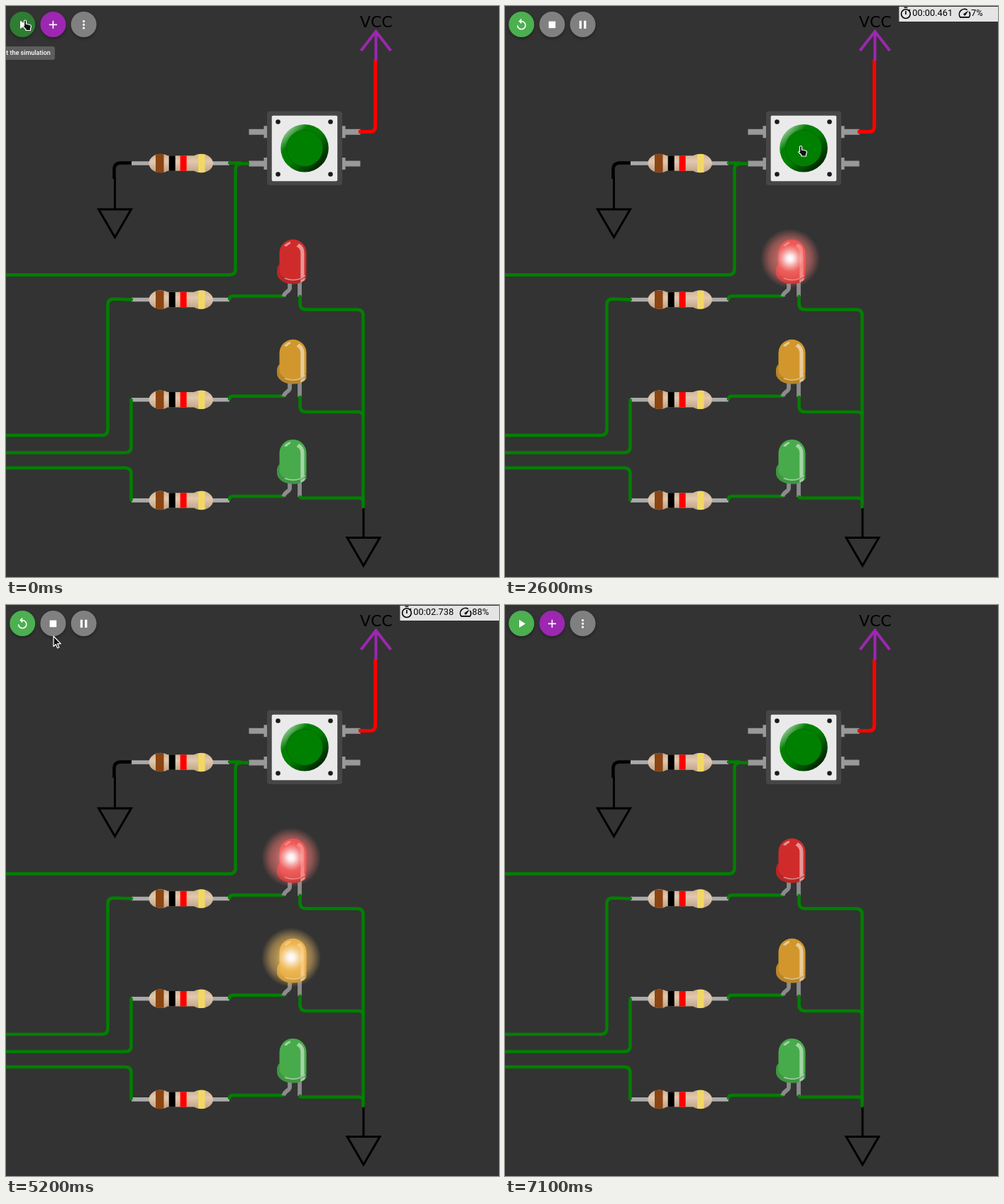
Write an HTML page that moves like this. It is 695 px wide and 806 px high and loops after 7.6 s.

```html
<!DOCTYPE html>
<html lang="en">
<head>
<meta charset="utf-8">
<title>Traffic light circuit</title>
<style>
  html, body { margin: 0; width: 100%; height: 100%; overflow: hidden; background: #333; }
  svg { position: absolute; left: 0; top: 0; }
  text { font: 12.8px Roboto, sans-serif; }
  .wire { fill: none; stroke: #008000; stroke-width: 4.5; stroke-linecap: round; stroke-linejoin: round; }
  .disc { filter: drop-shadow(0 2px 2px rgba(0, 0, 0, .35)); }
  #tip {
    position: absolute; top: 57px; transform: translateX(-50%); white-space: nowrap;
    padding: 0 6.4px; border-radius: 3.2px; background: #5d5d5d; color: #fff;
    font: 500 9px/19px Roboto, sans-serif;
  }
</style>
</head>
<body>
<svg width="695" height="806" viewBox="0 0 695 806">
  <defs>
    <linearGradient id="skin" x2="0" y2="1">
      <stop stop-color="#cbb094"/><stop offset=".4" stop-color="#e1c8ae"/><stop offset="1" stop-color="#bea287"/>
    </linearGradient>
    <linearGradient id="rim" x2="1" y2="1">
      <stop stop-color="#fff"/><stop offset=".3" stop-color="#008000"/>
      <stop offset=".5" stop-color="#008000"/><stop offset="1"/>
    </linearGradient>
    <path id="tube" d="M41 0C32 0 24.500 6 24.500 13.300S32 26.600 41 26.600q6 0 10-2.600H88q4 2.600 10 2.600c9 0 17-6 17-13.300S107 0 98 0q-6 0-10 2.600H51Q47 0 41 0z"/>
    <clipPath id="tubeClip"><use href="#tube"/></clipPath>
    <g id="resistor">
      <path stroke="#aaa" stroke-width="5.600" d="M0 13.300H138"/>
      <use href="#tube" fill="url(#skin)"/>
      <g clip-path="url(#tubeClip)">
        <path fill="#8b4513" d="M34 0h11.500v27H34z"/>
        <path d="M52.700 0h9v27h-9z"/>
        <path fill="red" d="M68.600 0h9v27h-9z"/>
        <path fill="#f1d863" d="M94 0h9.500v27H94z"/>
      </g>
    </g>
    <g id="led">
      <path fill="none" stroke="#8c8c8c" stroke-width="5.800" d="M32 58V81M18 58V69q0 2-4 5t-4.500 6.500"/>
      <path fill="currentColor" d="M3.500 35V19a19 19 0 0 1 38 0V55.500q-7 7.400-19 7.400C10 62.900 0 56 0 47.200V43q0-4.500 3.500-8z"/>
      <path opacity=".12" d="M3.500 35v8.200a19 13.300 0 0 0 38 0V55.500q-7 7.400-19 7.400C10 62.900 0 56 0 47.200V43q0-4.500 3.500-8z"/>
      <g fill="#fff" opacity=".5">
        <path d="M13.600 10 9.800 9.300Q13.500 4.500 19.300 3.300l-.7 2.900q-3.100 1-5 3.800z"/>
        <path d="M39.400 53.400v4.100q-2.500 2-6.200 3.500v-4.100q3.500-1.400 6.200-3.500z"/>
        <path d="M38.500 51V19q0-9-7.500-13.200L27.500 10q5.800 2.800 5.800 9v35.400q-10 4.200-21.500-.2L10 55.300Q16 58 22.600 58q11 0 17.600-6.400l-.8-1.900z"/>
      </g>
    </g>
    <path id="earth" fill="none" stroke="#000" stroke-width="3" d="M0-46V0M-23 0h46L0 39.500z"/>
    <path id="pin" fill="#999" d="M0-8.500h4.500V-4H25.500V4H4.500V8.500H0z"/>
  </defs>

  <g id="parts"></g>

  <!-- push button -->
  <g id="pins"></g>
  <rect x="368" y="148.500" width="106" height="104.500" rx="4" fill="#464646"/>
  <rect x="374.700" y="154.700" width="92.500" height="92.500" rx="1.800" fill="#eaeaea"/>
  <path stroke="#1b1b1b" stroke-width="6.600" stroke-linecap="round" d="M383.500 163.500h0m74 0h0m-74 74h0m74 0h0"/>
  <circle cx="421" cy="200.700" r="33.800" fill="url(#rim)"/>
  <circle cx="421" cy="200.700" r="25.700" fill="#008000" stroke="#2f2f2f" stroke-opacity=".5" stroke-width=".7"/>

  <!-- wires -->
  <use href="#earth" x="153.500" y="287"/><use href="#earth" x="504" y="750.500"/>
  <path class="wire" d="M0 379.500H315q8.500 0 8.500-8.500V231q0-8.500 8.500-8.500H341M315 221.500H330"/>
  <path class="wire" d="M0 606H135q8.500 0 8.500-8.500V422q0-8.500 8.500-8.500l25 1"/>
  <path class="wire" d="M0 630.500H168q8.500 0 8.500-8.500V556M0 652H168q8.500 0 8.500 8.500V697"/>
  <path class="wire" d="M414.500 410V420q0 8.500 8.500 8.500H495q8.500 0 8.500 8.500V707"/>
  <path class="wire" d="M414.500 552V564q0 9 8.500 9H497q6 0 6.500 6M414.500 693q0 1.500 3 1.500H497q6 0 6.500 4"/>
  <path fill="none" stroke="#000" stroke-width="4.500" d="M177 221.500H162q-9.500 0-9.500 9.500V244"/>
  <path fill="none" stroke="red" stroke-width="5" d="M520.700 76V170q0 7.500-7.500 7.500H497"/>
  <path fill="none" stroke="#9c27b0" stroke-width="4" d="M521.500 77V36M500.500 63 521.500 36 542.500 63"/>
  <text x="522" y="29.500" text-anchor="middle" style="font: 22px 'DejaVu Sans', sans-serif">VCC</text>

  <g id="buttons"></g>

  <g id="meter">
    <path fill="#e4e4e4" d="M555.500 1H695V22H555.500z"/>
    <g transform="translate(555.400 .7) scale(.8)" fill="none" stroke="#000" stroke-width="2">
      <circle cx="12" cy="13" r="8"/><path d="M9 2h6M12 8v6M17.500 7.500l2-2"/>
    </g>
    <g transform="translate(638.400 .7) scale(.8)">
      <path fill="none" stroke="#000" stroke-width="2" d="M16.500 6.200A9 9 0 0 0 4.200 19H19.800a9 9 0 0 0 0-9.900"/>
      <path d="M10.600 15.400a2 2 0 0 0 2.800 0L19 7l-8.400 5.600a2 2 0 0 0 0 2.800z"/>
    </g>
    <text id="clock" x="574.300" y="14"></text>
    <text id="speed" x="657" y="14"></text>
  </g>
</svg>
<div id="tip"></div>
<svg width="695" height="806">
  <path id="cursor" fill="#111" stroke="#fff" stroke-width="1.200" stroke-linejoin="round"/>
</svg>
<script>
const $ = id => document.getElementById(id);
const LOOP = 7600, START = 1600, STOP = 6700, FADE = 200;

const ICONS = {
  play: 'M8 5v14l11-7z',
  plus: 'M19 13h-6v6h-2v-6H5v-2h6V5h2v6h6z',
  more: 'M12 4a2 2 0 1 0 .01 0zm0 6a2 2 0 1 0 .01 0zm0 6a2 2 0 1 0 .01 0z',
  restart: 'M12 5V1L7 6l5 5V7a6 6 0 1 1-6 6H4a8 8 0 1 0 8-8z',
  stop: 'M6 6h12v12H6z',
  pause: 'M6 5h4v14H6zm8 0h4v14h-4z'
};
const HAND = 'M-1.500 8V1.500a1.500 1.500 0 0 1 3 0V5.500l5 1q2 .5 2 2.500l-1 3v2.500H1V13L-3 9q-.5-1.500 1.500-1z';
const ARROW = 'M0 0V14.500l3.300-3 2.300 5.200 2.300-1-2.300-5h4.600z';

// stops of the pointer: time, x, y
const STOPS = [[500, 27, 20], [1300, 310, 78], [1700, 417, 197.5], [3300, 417, 197.5],
  [4400, 152, 94], [5200, 67, 44], [5600, 69, 33.5]];
// time, simulated ms, speed in percent
const METER = [[START, 0, 0], [1900, 200, 0], [2500, 400, 0], [3300, 886, 58], [4400, 2018, 99],
  [5200, 2738, 88], [5900, 3038, 44], [STOP, 3390, 44]];
const LEDS = [
  { color: '#d02b2b', glow: '#ff7c78', lit: [[2300, 2800], [5200, 6600]] },
  { color: '#d1972d', glow: '#ffc868', lit: [[2800, 3100], [4700, 5200]] },
  { color: '#48ab4b', glow: '#34e84c', lit: [[3200, 4500]] }
];

const linear = f => f;
const easeOut = f => 1 - (1 - f) ** 2;
const ramp = (t, from, length) => Math.min(1, Math.max(0, (t - from) / length));
const level = (led, t) =>
  Math.max(...led.lit.map(([on, off]) => ramp(t, on - FADE, FADE) - ramp(t, off, FADE)));

function follow(keys, t, ease) {
  const next = Math.max(1, keys.findIndex(k => k[0] > t));
  const i = t >= keys[keys.length - 1][0] ? keys.length - 1 : next;
  const [a, ...from] = keys[i - 1], [b, ...to] = keys[i];
  const f = ease(ramp(t, a, b - a));
  return from.map((v, n) => v + (to[n] - v) * f);
}

const resistor = y => `<use href="#resistor" x="177" y="${y - 13.3}"/>`;
const row = (led, i) => {
  const y = 329.5 + i * 141.2;
  return resistor(y + 85 + (i === 2 ? 1 : 0)) +
    `<path class="wire" d="M315 ${y + 84}q0-4 5-4H391.5"/>
    <use href="#led" x="382" y="${y}" color="${led.color}"/>
    <radialGradient id="halo${i}">
      <stop stop-color="#fff"/><stop offset=".12" stop-color="#fff" stop-opacity=".9"/>
      <stop offset=".45" stop-color="${led.glow}" stop-opacity=".65"/>
      <stop offset=".7" stop-color="${led.glow}" stop-opacity=".45"/>
      <stop offset="1" stop-color="${led.glow}" stop-opacity="0"/>
    </radialGradient>
    <circle id="glow${i}" cx="402" cy="${y + 26.8}" r="42" fill="url(#halo${i})"/>`;
};
$('parts').innerHTML = resistor(222) + LEDS.map(row).join('');

$('pins').innerHTML = [177.7, 222.5].map(y =>
  `<use href="#pin" x="474" y="${y}"/><use href="#pin" transform="translate(368 ${y}) scale(-1 1)"/>`).join('');

$('buttons').innerHTML = [0, 1, 2].map(i => {
  const x = 23.2 + i * 43.2;
  return `<circle id="disc${i}" class="disc" cx="${x}" cy="26" r="18"/>
    <path id="icon${i}" fill="#fff" transform="translate(${x - 9.6} 16.8) scale(.8)"/>`;
}).join('');

function drawPanel(t, running) {
  const icons = running ? ['restart', 'stop', 'pause'] : ['play', 'plus', 'more'];
  const fills = [t < 700 ? '#2e7d32' : '#4caf50', running ? '#808080' : '#9c27b0', '#808080'];
  icons.forEach((name, i) => {
    $('icon' + i).setAttribute('d', ICONS[name]);
    $('disc' + i).setAttribute('fill', fills[i]);
  });

  const [ms, percent] = follow(METER, t, linear);
  $('meter').style.display = running ? '' : 'none';
  $('clock').textContent = '00:' + (ms / 1000).toFixed(3).padStart(6, '0');
  $('speed').textContent = Math.round(percent) + '%';
}

function drawTip(t) {
  const late = t > 3000, tip = $('tip');
  tip.textContent = (late ? 'Stop' : t < START ? 'Start' : 'Restart') + ' the simulation';
  tip.style.left = (late ? 66.4 : 23.2) + 'px';
  tip.style.opacity = late ? ramp(t, 5600, FADE) * (t < STOP) : 1 - ramp(t, 1800, FADE);
}

function drawCursor(t) {
  const arrow = (t >= 700 && t < 1700) || (t >= 4500 && t < 5500);
  $('cursor').setAttribute('d', arrow ? ARROW : HAND);
  $('cursor').setAttribute('transform', `translate(${follow(STOPS, t, easeOut)})`);
  $('cursor').style.display = t < 6900 ? '' : 'none';
}

function draw(t) {
  drawPanel(t, t >= START && t < STOP);
  LEDS.forEach((led, i) => $('glow' + i).setAttribute('opacity', level(led, t)));
  drawTip(t);
  drawCursor(t);
}

const begin = performance.now();
function tick() {
  const t = (performance.now() - begin) % LOOP;
  draw(Math.floor(t / 100) * 100); // the picture advances ten times a second
  requestAnimationFrame(tick);
}
tick();
</script>
</body>
</html>
```
